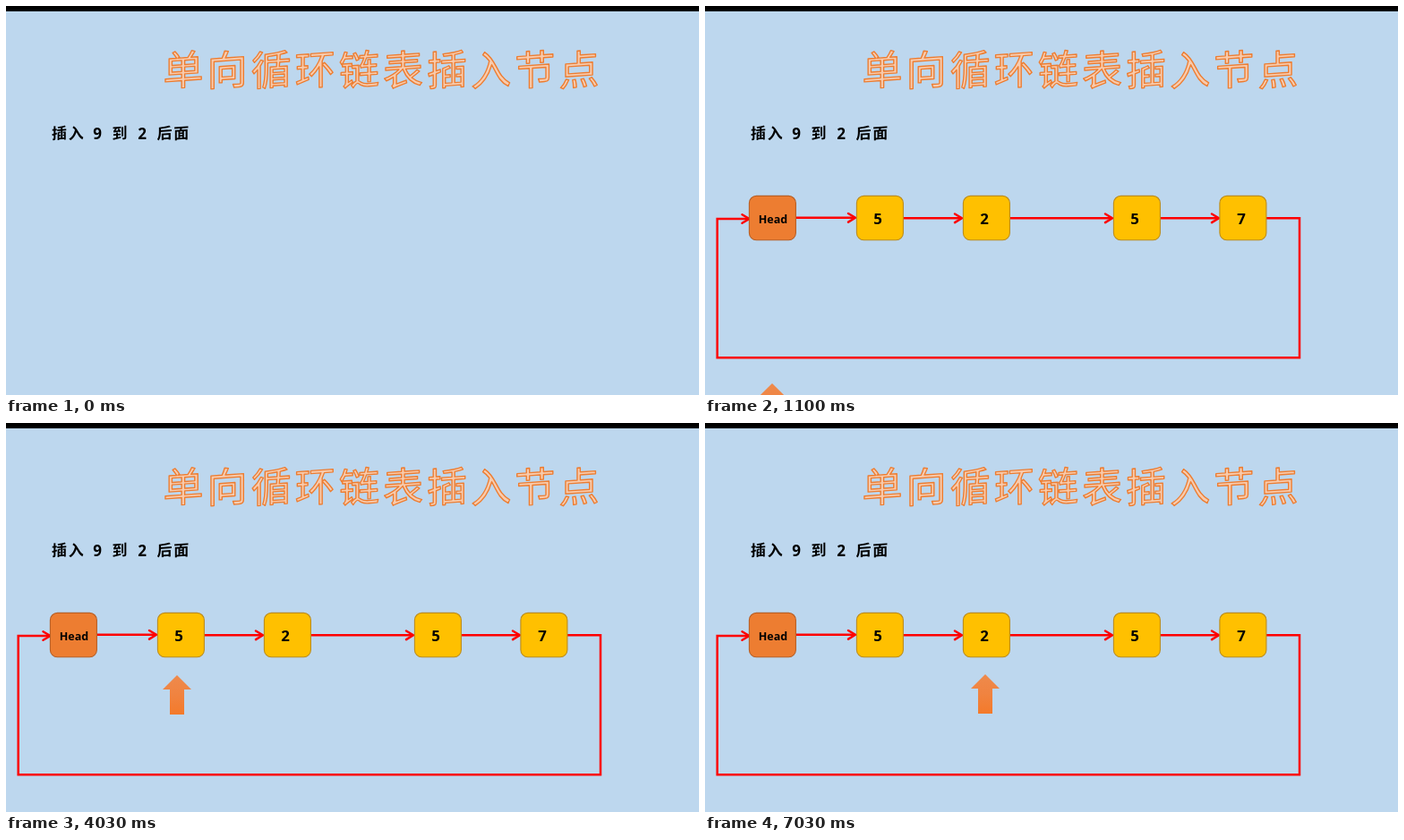
Write an HTML page with a canvas that moves like this. It is 774 px wide and 435 px high and loops after 8 s.

```html
<!DOCTYPE html>
<html lang="zh-CN">
<head>
<meta charset="utf-8">
<title>单向循环链表插入节点</title>
<style>
  html, body { margin: 0; width: 100%; height: 100%; overflow: hidden; background: #bdd7ee; }
  canvas { display: block; }
</style>
</head>
<body>
<canvas id="stage" width="774" height="435"></canvas>
<script>
const W = 774, H = 435, LOOP = 8000;
const ctx = document.getElementById('stage').getContext('2d');
const CJK = '"Noto Sans CJK SC", "Noto Sans CJK", sans-serif';
const LATIN = '"Open Sans", "Noto Sans", sans-serif';
const ORANGE = '#ed7d31', RED = '#ff0000';

const nodes = [
  { x: 49, label: 'Head', tx: 76, fill: ORANGE, edge: '#b95f24' },
  { x: 169, label: '5', tx: 193 },
  { x: 288, label: '2', tx: 312 },
  { x: 456, label: '5', tx: 480 },
  { x: 574.5, label: '7', tx: 599 }
];
const links = [[102, 168, 236.8], [221, 287, 237.3], [340, 455, 237.3], [508, 574, 237.3]];

const clamp = v => Math.min(1, Math.max(0, v));
const ease = u => u < 0.5 ? 2 * u * u : 1 - 2 * (1 - u) * (1 - u);
const hold = (t, from, step) => from + Math.floor((t - from) / step) * step;

function text(str, x, y, font, color = '#000') {
  ctx.font = font;
  ctx.textAlign = 'center';
  ctx.fillStyle = color;
  ctx.fillText(str, x, y);
}

// Brush-like lettering: evenly pitched glyphs whose level strokes rise to the right.
function brush(str, x, y, pitch, font, color, outline) {
  [...str].forEach((ch, i) => {
    ctx.save();
    ctx.translate(x + i * pitch, y);
    ctx.transform(1, -0.07, 0, 1, 0, 0);
    text(ch, 0, 0, font, color);
    if (outline) {
      ctx.strokeStyle = outline;
      ctx.lineWidth = 1.4;
      ctx.lineJoin = 'round';
      ctx.strokeText(ch, 0, 0);
    }
    ctx.restore();
  });
}

function polyline(points) {
  ctx.beginPath();
  points.forEach(([x, y]) => ctx.lineTo(x, y));
  ctx.stroke();
}

function arrowHead(x, y) {
  ctx.lineJoin = ctx.lineCap = 'round';
  polyline([[x - 8, y - 4.8], [x, y], [x - 8, y + 4.8]]);
  ctx.lineJoin = 'miter';
  ctx.lineCap = 'butt';
}

// Shift a part down by what is left of its way from below the stage.
function flyIn(top, p, draw) {
  ctx.save();
  ctx.translate(0, Math.round((H - top) * (1 - p)));
  draw();
  ctx.restore();
}

function drawHeading() {
  ctx.fillStyle = '#bdd7ee';
  ctx.fillRect(0, 0, W, H);
  ctx.fillStyle = '#000';
  ctx.fillRect(0, 0, W, 6);

  brush('单向循环链表插入节点', 198, 88, 49.1, '400 45px ' + CJK, '#f8cbad', ORANGE);

  [['插入', 59.5], ['到', 127], ['后面', 177]].forEach(([s, x]) =>
    brush(s, x, 148.5, 18.7, '700 17px ' + CJK));
  [['9', 102], ['2', 152]].forEach(([s, x]) => text(s, x, 149, '700 17px ' + LATIN));
}

function drawLinks() {
  ctx.strokeStyle = RED;
  ctx.lineWidth = 2.5;
  ctx.lineJoin = 'miter';
  for (const [x1, x2, y] of links) {
    polyline([[x1, y], [x2, y]]);
    arrowHead(x2, y);
  }
  polyline([[627, 237.3], [664, 237.3], [664, 393.3], [13.7, 393.3], [13.7, 238], [49, 238]]);
  arrowHead(49.5, 238);
}

function drawBox({ x, fill = '#ffc000', edge = '#bc8c1a' }) {
  ctx.beginPath();
  ctx.roundRect(x + 0.4, 212.4, 52, 49.3, 8);
  ctx.fillStyle = fill;
  ctx.fill();
  ctx.strokeStyle = edge;
  ctx.lineWidth = 1.1;
  ctx.stroke();
}

function drawLabel({ label, tx }) {
  const head = label === 'Head';
  text(label, tx, head ? 243 : 244, `700 ${head ? 12.5 : 16.8}px ${LATIN}`);
}

function drawChain(t) {
  if (t < 40) return;
  const p = clamp((hold(t, 40, 55) + 5) / 530);
  flyIn(231, p, drawLinks);
  flyIn(212, p, () => nodes.forEach(drawBox));
  flyIn(221, p, () => nodes.forEach(drawLabel));
}

function pointerAt(t) {
  if (t < 2170) {
    const p = clamp((hold(t, 1100, 60) - 1055) / 525);
    return [75, 282 + (H - 282) * (1 - p)];
  }
  if (t < 5080) {
    const u = t >= 4030 ? 1 : (hold(t, 2170, 60) - 2060) / 2000;
    return [75 + 116 * ease(clamp(u)), 282];
  }
  const u = t >= 7030 ? 1 : (hold(t, 5080, 60) - 5078) / 2000;
  return [189 + 124 * ease(clamp(u)), 281];
}

function drawPointer(t) {
  if (t < 1100) return;
  const [x, y] = pointerAt(t);
  const shade = ctx.createLinearGradient(0, y, 0, y + 44);
  shade.addColorStop(0, '#ee8a4c');
  shade.addColorStop(0.5, '#f08340');
  shade.addColorStop(1, '#f47a2a');
  ctx.fillStyle = shade;
  ctx.beginPath();
  [[0, 0], [16, 16], [8, 16], [8, 44], [-8, 44], [-8, 16], [-16, 16]]
    .forEach(([dx, dy]) => ctx.lineTo(x + dx, y + dy));
  ctx.fill();
}

function render() {
  const t = performance.now() % LOOP;
  drawHeading();
  drawChain(t);
  drawPointer(t);
  requestAnimationFrame(render);
}
render();
</script>
</body>
</html>
```
